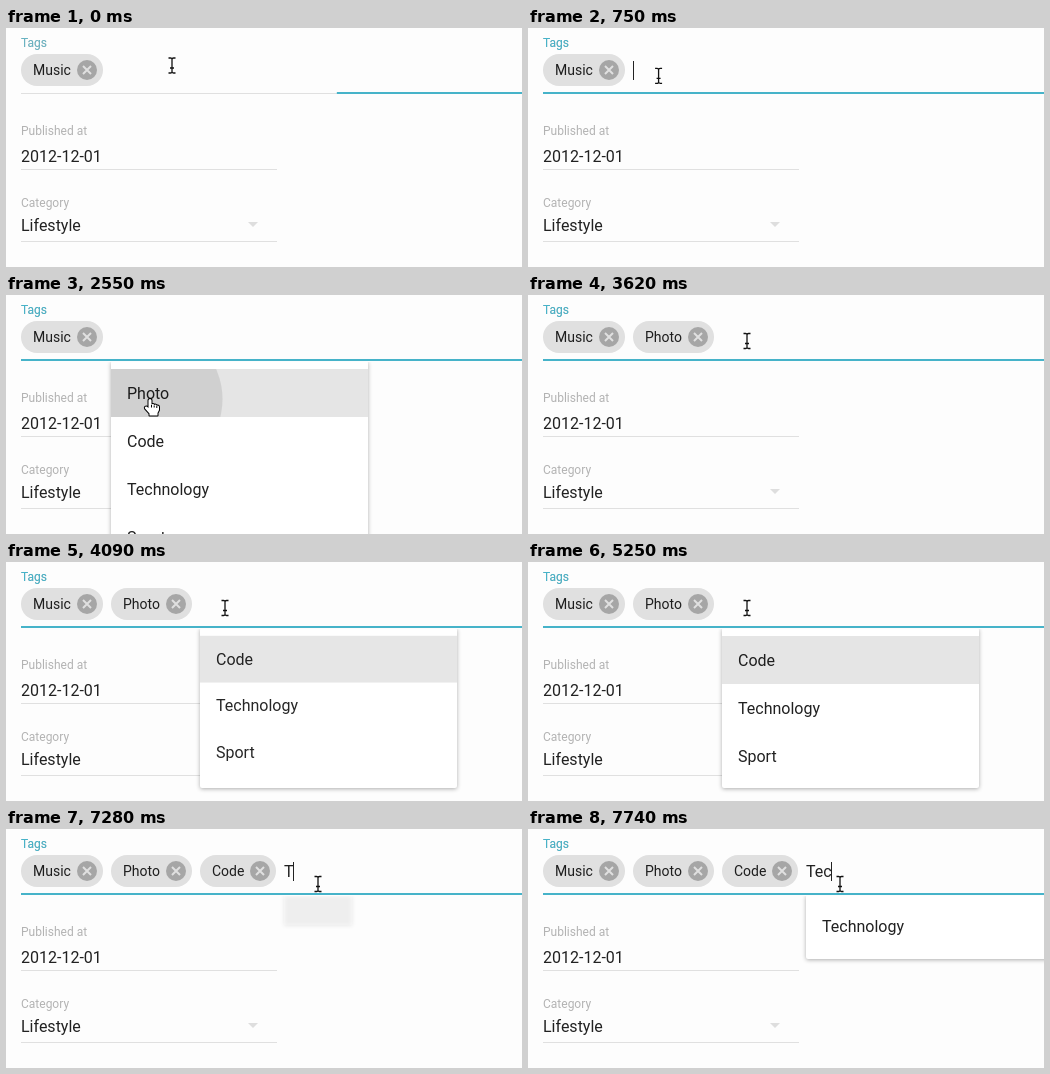
These frames come from a looping animation (516 by 239 pixels, 8000 ms). An HTML page with a canvas:

```html
<!DOCTYPE html>
<html lang="en">
<head>
<meta charset="utf-8">
<title>Tag field</title>
<style>
  html, body { margin: 0; width: 100%; height: 100%; overflow: hidden; background: #fdfdfd; }
  canvas { display: block; }
</style>
</head>
<body>
<canvas id="stage" width="516" height="239"></canvas>
<script>
const ctx = document.getElementById('stage').getContext('2d');
const LOOP = 8000, TEAL = '#46b3c9', INK = 'rgba(0,0,0,.87)';
const POPUP_TOP = 66, POPUP_WIDTH = 257, ITEM = 48, PAD = 8;

const chips = [
  { label: 'Music', x: 15, width: 82, at: 0 },
  { label: 'Photo', x: 105, width: 81, at: 2690 },
  { label: 'Code', x: 194, width: 76, at: 6020 }
];

const popups = [
  { x: 105, open: 1411, click: 2470, close: 2670, tap: [39, 38], lit: true,
    items: () => ['Photo', 'Code', 'Technology', 'Sport'] },
  { x: 194, open: 3823, click: 5800, close: 6000, tap: [49, 40], lit: true,
    items: () => ['Code', 'Technology', 'Sport'] },
  { x: 278, open: 7265, click: Infinity, close: Infinity, lit: false,
    items: t => t < 7460 ? ['Technology', 'Sport'] : ['Technology'] }
];

const typing = [[7280, 'T'], [7460, 'e'], [7640, 'c']];
const caretOn = [[530, 1040], [3110, 3620], [6020, 7050], [7280, LOOP]];

// time, x, y of the pointer's hot spot
const pointerPath = [
  [30, 166, 37.5], [810, 130, 48], [2060, 130, 48], [2420, 144, 104],
  [2660, 144, 104], [2860, 185, 58], [3110, 219, 46], [5250, 219, 46],
  [5640, 243, 106], [6000, 243, 106], [6150, 252, 76], [6540, 312, 55]
];

const hand = new Path2D('M-1.5 9V1.5a1.5 1.5 0 0 1 3 0V6a1.4 1.4 0 0 1 2.7.3a1.4 1.4 0 0 1 2.6.6' +
  'a1.3 1.3 0 0 1 2.2 1.1V11L7.5 14V16.5H-.5V14.5L-5 9.5a1.4 1.4 0 0 1 2-1.8Z');
const handLines = new Path2D('M1.5 6V8.5M4.2 6.5V8.5M6.8 7V9');
const arrow = new Path2D('M0 0V13.5L3 10.7 5.2 15.8 7.6 14.8 5.5 9.8H9.5Z');
const iBeam = new Path2D('M-3.5-7.5H-1.5Q0-7.5 0-6Q0-7.5 1.5-7.5H3.5M0-6.5V6.5' +
  'M-3.5 7.5H-1.5Q0 7.5 0 6Q0 7.5 1.5 7.5H3.5M-2 2.5H2');

const clamp = v => Math.min(1, Math.max(0, v));

// cubic-bezier(.23, 1, .32, 1)
function easeOut(p) {
  p = clamp(p);
  let lo = 0, hi = 1;
  for (let i = 0; i < 20; i++) {
    const s = (lo + hi) / 2, r = 1 - s;
    if (3 * r * r * s * .23 + 3 * r * s * s * .32 + s ** 3 < p) lo = s; else hi = s;
  }
  return 1 - (1 - lo) ** 3;
}

function rect(x, y, w, h, color) {
  ctx.fillStyle = color;
  ctx.fillRect(x, y, w, h);
}

function text(str, x, y, size = 16, color = INK) {
  ctx.font = size + 'px Roboto, sans-serif';
  ctx.fillStyle = color;
  ctx.fillText(str, x, y);
}

function drawForm(t) {
  const focus = easeOut((t + 41) / 450);
  text('Tags', 15, 19, 12, '#b3b3b3');
  ctx.globalAlpha = .5 + .5 * focus;
  text('Tags', 15, 19, 12, TEAL);
  ctx.globalAlpha = 1;
  rect(15, 65, 501, 1, '#e0e0e0');
  rect(520 - 505 * focus, 64, 1010 * focus, 2, TEAL);

  text('Published at', 15, 107, 12, '#b3b3b3');
  text('2012-12-01', 15, 134);
  rect(15, 141, 256, 1, '#e0e0e0');
  text('Category', 15, 179, 12, '#b3b3b3');
  text('Lifestyle', 15, 203);
  rect(15, 213, 256, 1, '#e0e0e0');
  ctx.fillStyle = '#dedede';
  ctx.fill(new Path2D('M242 194H252L247 199Z'));
}

function drawChip({ label, x, width }) {
  ctx.fillStyle = '#e0e0e0';
  ctx.beginPath();
  ctx.roundRect(x, 26, width, 32, 16);
  ctx.fill();
  text(label, x + 12, 47, 14);
  const cx = x + width - 16;
  ctx.fillStyle = '#a6a6a6';
  ctx.beginPath();
  ctx.arc(cx, 42, 10, 0, 7);
  ctx.fill();
  ctx.strokeStyle = '#e0e0e0';
  ctx.lineWidth = 2;
  ctx.stroke(new Path2D(`M${cx - 4} 38l8 8m0-8l-8 8`));
}

function drawInput(t, x) {
  const typed = typing.filter(k => t >= k[0]).map(k => k[1]).join('');
  text(typed, x, 48);
  if (caretOn.some(([from, to]) => t >= from && t < to)) {
    rect(Math.floor(x + ctx.measureText(typed).width), 33, 1, 19, '#222');
  }
}

function drawPopup(p, t) {
  if (t < p.open || t > p.close + 500) return;
  const scale = ms => easeOut((t - p.open) / ms) * (1 - easeOut((t - p.close) / ms));
  const sx = scale(250), sy = scale(500);
  if (sx < .002) return;
  const items = p.items(t);

  ctx.save();
  ctx.beginPath();
  ctx.rect(0, POPUP_TOP + 1, 516, 239);
  ctx.clip();
  ctx.translate(p.x, POPUP_TOP);
  ctx.scale(sx, sx);
  ctx.globalAlpha = sx;
  ctx.save();
  ctx.shadowColor = 'rgba(0,0,0,.32)';
  ctx.shadowBlur = 4;
  ctx.shadowOffsetY = 1;
  ctx.fillStyle = '#fff';
  ctx.beginPath();
  ctx.roundRect(0, 0, POPUP_WIDTH, items.length * ITEM + 2 * PAD, 2);
  ctx.fill();
  ctx.restore();

  ctx.scale(sx, sy);
  ctx.globalAlpha = sx * sx * sy;
  if (p.lit) rect(0, PAD, POPUP_WIDTH, ITEM, 'rgba(0,0,0,.1)');
  if (t >= p.click) drawRipple(p, t);
  items.forEach((item, i) => text(item, 16, PAD + i * ITEM + 29.5));
  ctx.restore();
}

function drawRipple({ tap: [x, y], click }, t) {
  ctx.save();
  ctx.beginPath();
  ctx.rect(0, PAD, POPUP_WIDTH, ITEM);
  ctx.clip();
  ctx.fillStyle = 'rgba(0,0,0,.092)';
  ctx.beginPath();
  ctx.arc(x, y, Math.hypot(POPUP_WIDTH - x, 30) * easeOut((t - click) / 1000), 0, 7);
  ctx.fill();
  ctx.restore();
}

function pointerAt(t) {
  const next = pointerPath.findIndex(k => k[0] > t);
  if (next === 0) return pointerPath[0].slice(1);
  if (next < 0) return pointerPath.at(-1).slice(1);
  const [t0, x0, y0] = pointerPath[next - 1], [t1, x1, y1] = pointerPath[next];
  const u = (t - t0) / (t1 - t0), k = u * u * (3 - 2 * u);
  return [x0 + (x1 - x0) * k, y0 + (y1 - y0) * k];
}

function outlined(path, fill, stroke, width) {
  ctx.lineWidth = width;
  ctx.fillStyle = fill;
  ctx.strokeStyle = stroke;
  ctx.stroke(path);
  ctx.fill(path);
}

function drawPointer(t) {
  const [x, y] = pointerAt(t);
  const overItem = y > 74 && popups.some(p => t >= p.open && t < p.close);
  ctx.save();
  ctx.translate(x, y);
  ctx.lineJoin = 'round';
  if (overItem) {
    outlined(hand, '#fff', '#000', 2);
    ctx.lineWidth = 1;
    ctx.stroke(handLines);
  } else if (y < 64) {
    ctx.lineWidth = 1.3;
    ctx.strokeStyle = '#111';
    ctx.stroke(iBeam);
  } else {
    outlined(arrow, '#000', '#fff', 2);
  }
  ctx.restore();
}

function draw(t) {
  rect(0, 0, 516, 239, '#fdfdfd');
  drawForm(t);
  const shown = chips.filter(c => t >= c.at);
  shown.forEach(drawChip);
  const last = shown.at(-1);
  drawInput(t, last.x + last.width + 8);
  popups.forEach(p => drawPopup(p, t));
  drawPointer(t);
}

const start = performance.now();
function tick() {
  draw((performance.now() - start) % LOOP);
  requestAnimationFrame(tick);
}
tick();
</script>
</body>
</html>
```
